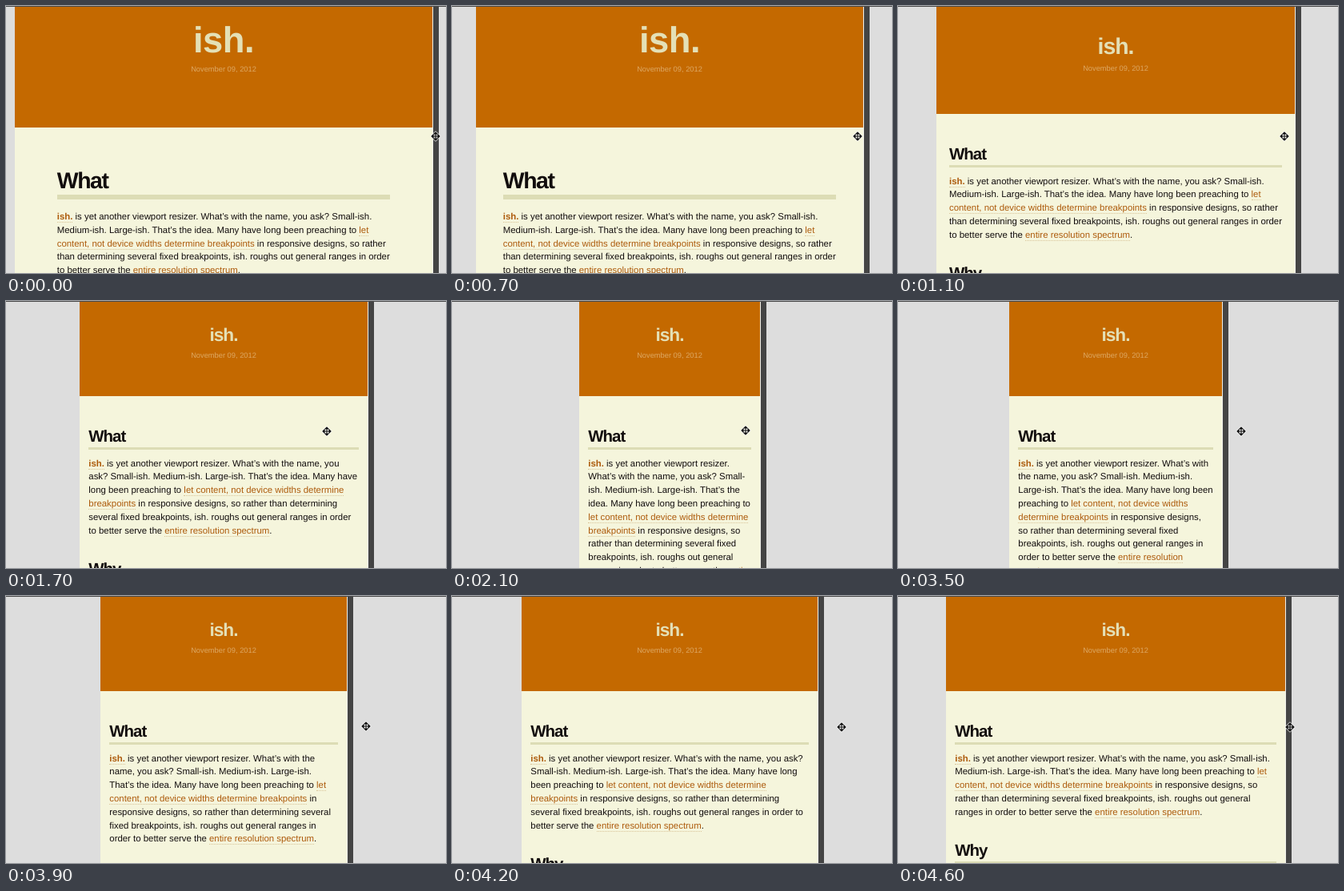
An HTML page that plays this animation: 550 by 334 pixels, repeating every 4.7 s.

```html
<!DOCTYPE html>
<html lang="en">
<head>
<meta charset="utf-8">
<title>Viewport resizer</title>
<style>
html, body { margin: 0; width: 100%; height: 100%; overflow: hidden; background: #ddd; }
#stage {
  position: relative; width: 550px; height: 334px; overflow: hidden;
  font: 11.4px/16.8px "Liberation Sans", Arial, sans-serif;
  color: #120d0d; text-rendering: geometricPrecision;
}
#top { position: absolute; inset: 0 0 auto; height: 1px; background: #4a4a4a; }
#page { position: absolute; top: 1px; bottom: 0; overflow: hidden; background: #f5f5dc; }
#bar { position: absolute; top: 1px; bottom: 0; width: 7px; background: #444; border-left: 1px solid #f0f0ea; }
#cursor { position: absolute; left: -8px; top: -8px; width: 16px; height: 16px; }

header { position: relative; height: 118px; background: #c46900; text-align: center; }
h1, time { position: absolute; left: 0; right: 0; margin: 0; line-height: 1; white-space: nowrap; }
h1 { top: 29.8px; font-size: 22.7px; letter-spacing: -1px; color: #e4e0b6; }
time { top: 63px; font-size: 9.3px; color: #dda863; }

main { max-width: 416.5px; margin: 0 auto; }
#pad { padding: 0 11.3px; }
h2 {
  margin: 29.7px 0 10px; padding-bottom: 2.5px; border-bottom: 3px solid #dcdcb5;
  font-size: 20.5px; line-height: 1; letter-spacing: -.05em;
}
h2:first-child { margin-top: 0; padding-top: 40.6px; }
p { margin: 0; }
a { color: #ad5b0c; border-bottom: 1px dotted #d9c59a; }

.medium header { height: 134px; }
.medium h1 { top: 35.5px; font-size: 28.4px; }
.medium time { top: 73px; }
.medium #pad { padding: 0 16px; }

.large header { height: 151px; }
.large h1 { top: 18.6px; font-size: 45.4px; letter-spacing: -.5px; }
.large time { top: 73.6px; }
.large #pad { padding: 0 16px; }
.large h2 { margin-bottom: 14px; padding-bottom: 2.6px; border-bottom-width: 6px; font-size: 28.4px; }
.large h2:first-child { padding-top: 53px; }
</style>
</head>
<body>
<div id="stage">
  <div id="page">
    <header><h1>ish.</h1><time>November 09, 2012</time></header>
    <div id="pad"><main>
      <h2>What</h2>
      <p><a><b>ish.</b></a> is yet another viewport resizer. What’s with the name, you ask? Small-ish. Medium-ish. Large-ish. That’s the idea. Many have long been preaching to <a>let content, not device widths determine breakpoints</a> in responsive designs, so rather than determining several fixed breakpoints, ish. roughs out general ranges in order to better serve the <a>entire resolution spectrum</a>.</p>
      <h2>Why</h2>
    </main></div>
  </div>
  <div id="bar"></div>
  <div id="top"></div>
  <svg id="cursor" viewBox="-8 -8 16 16">
    <defs><path id="move" d="M-4 0H4M0 -4V4M-3 -2L-5 0L-3 2ZM3 -2L5 0L3 2ZM-2 -3L0 -5L2 -3ZM-2 3L0 5L2 3Z"/></defs>
    <use href="#move" fill="#fff" stroke="#fff" stroke-width="2.6" opacity=".8"/>
    <use href="#move" fill="#111" stroke="#111" stroke-width="1.1"/>
  </svg>
</div>
<script>
const LOOP = 4700, STEP = 100, CENTER = 272;

// [time in ms, left edge of the page]
const edge = [
  [0, 11], [100, 11.5], [600, 25], [1000, 46], [1100, 48], [1200, 48], [1500, 70],
  [1700, 92], [1800, 123], [2000, 150], [2400, 186], [2600, 186], [2900, 190],
  [3000, 191], [3200, 186], [3500, 139], [3800, 128], [4200, 87], [4400, 63], [4600, 60]
];
// [time in ms, x, y]
const pointer = [
  [0, 537, 163], [600, 513, 163], [1100, 483, 163], [1700, 401, 163], [2000, 370, 162],
  [2400, 358, 161], [2600, 358, 161], [2900, 350, 161], [3200, 372, 162], [3500, 429, 163],
  [3800, 438, 163], [4200, 487, 164], [4600, 490, 164]
];

const $ = id => document.getElementById(id);
const page = $("page"), bar = $("bar"), cursor = $("cursor");

function at(track, t, col = 1) {
  const i = track.findIndex(k => k[0] >= t);
  if (i <= 0) return track[i < 0 ? track.length - 1 : 0][col];
  const a = track[i - 1], b = track[i];
  return a[col] + (b[col] - a[col]) * (t - a[0]) / (b[0] - a[0]);
}

function draw(t) {
  const left = Math.round(at(edge, t));
  const width = 2 * (CENTER - left);
  page.style.left = left + "px";
  page.style.width = width + "px";
  page.className = width > 480 ? "large" : width > 436 ? "medium" : "";
  bar.style.left = left + width + "px";
  const x = Math.round(at(pointer, t)), y = Math.round(at(pointer, t, 2));
  cursor.style.transform = `translate(${x}px, ${y}px)`;
}

const start = performance.now();
function tick() {
  const t = (performance.now() - start) % LOOP;
  draw(Math.floor(t / STEP) * STEP);
  requestAnimationFrame(tick);
}
draw(0);
requestAnimationFrame(tick);
</script>
</body>
</html>
```
